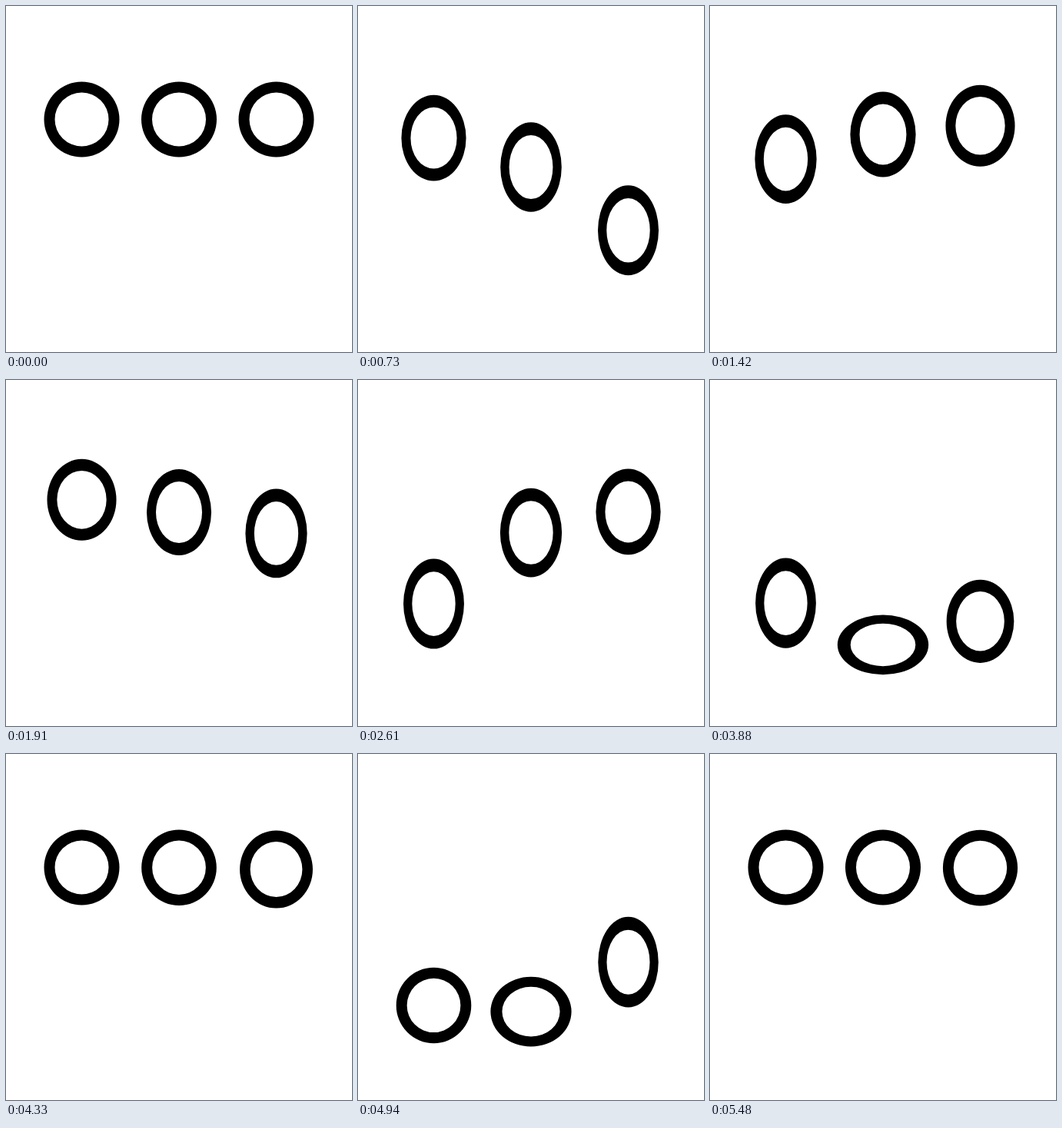
These frames come from a looping animation (450x450 px, 5.51 s). An HTML page with a canvas:

```html
<!DOCTYPE html>
<html lang="en">
<head>
<meta charset="utf-8">
<title>Bouncing rings</title>
<style>
  html, body { margin: 0; width: 100%; height: 100%; overflow: hidden; background: #fff; }
  canvas { display: block; width: 450px; height: 450px; }
</style>
</head>
<body>
<canvas id="stage" width="450" height="450"></canvas>
<script>
const ctx = document.getElementById('stage').getContext('2d');

const LOOP = 5510, FPS = 33, CYCLE = 1100;
const LAND = 400, BOTTOM = 492;
const TOP_Y = 147.5, OUTER = 49, INNER = 35;
const rings = [
  { x: 98.5, delay: 0 },
  { x: 225, delay: 83 },
  { x: 351.5, delay: 150 }
];

// Fall of a ring: [ms since start, px below the top]
const fall = [[0, 0], [90, 2], [172, 8], [242, 19.7], [324, 51.5],
              [352, 74], [406, 143.5], [457, 188], [492, 197]];

const smooth = x => x * x * (3 - 2 * x);

function slope(i) {
  if (i === 0 || i === fall.length - 1) return 0;
  const [x0, y0] = fall[i - 1], [x1, y1] = fall[i + 1];
  return (y1 - y0) / (x1 - x0);
}

function drop(t) {
  let i = 0;
  while (i < fall.length - 2 && t > fall[i + 1][0]) i++;
  const [x0, y0] = fall[i], [x1, y1] = fall[i + 1];
  const w = x1 - x0, u = (t - x0) / w, v = 1 - u;
  return y0 + (y1 - y0) * smooth(u) + w * u * v * (v * slope(i) - u * slope(i + 1));
}

// Positive: tall and thin; negative: flat and wide
function stretch(t) {
  return t < LAND
    ? 0.2 * smooth(t / LAND)
    : 0.2 - 0.41 * smooth((t - LAND) / (BOTTOM - LAND));
}

function drawRing(x, t) {
  // The rise mirrors the fall
  const p = Math.max(0, BOTTOM - Math.abs(t - BOTTOM));
  const y = TOP_Y + drop(p), s = stretch(p);
  ctx.beginPath();
  for (const r of [OUTER, INNER]) {
    ctx.moveTo(x + r * (1 - s), y);
    ctx.ellipse(x, y, r * (1 - s), r * (1 + s), 0, 0, Math.PI * 2);
  }
  ctx.fill('evenodd');
}

function draw(ms) {
  const t = Math.floor((ms % LOOP + 5) * FPS / 1000) * 1000 / FPS;
  ctx.fillStyle = '#fff';
  ctx.fillRect(0, 0, 450, 450);
  ctx.fillStyle = '#000';
  for (const { x, delay } of rings) drawRing(x, t % CYCLE - delay);
}

let start = null;
function tick(now) {
  if (start === null) start = now;
  draw(now - start);
  requestAnimationFrame(tick);
}
draw(0);
requestAnimationFrame(tick);
</script>
</body>
</html>
```
